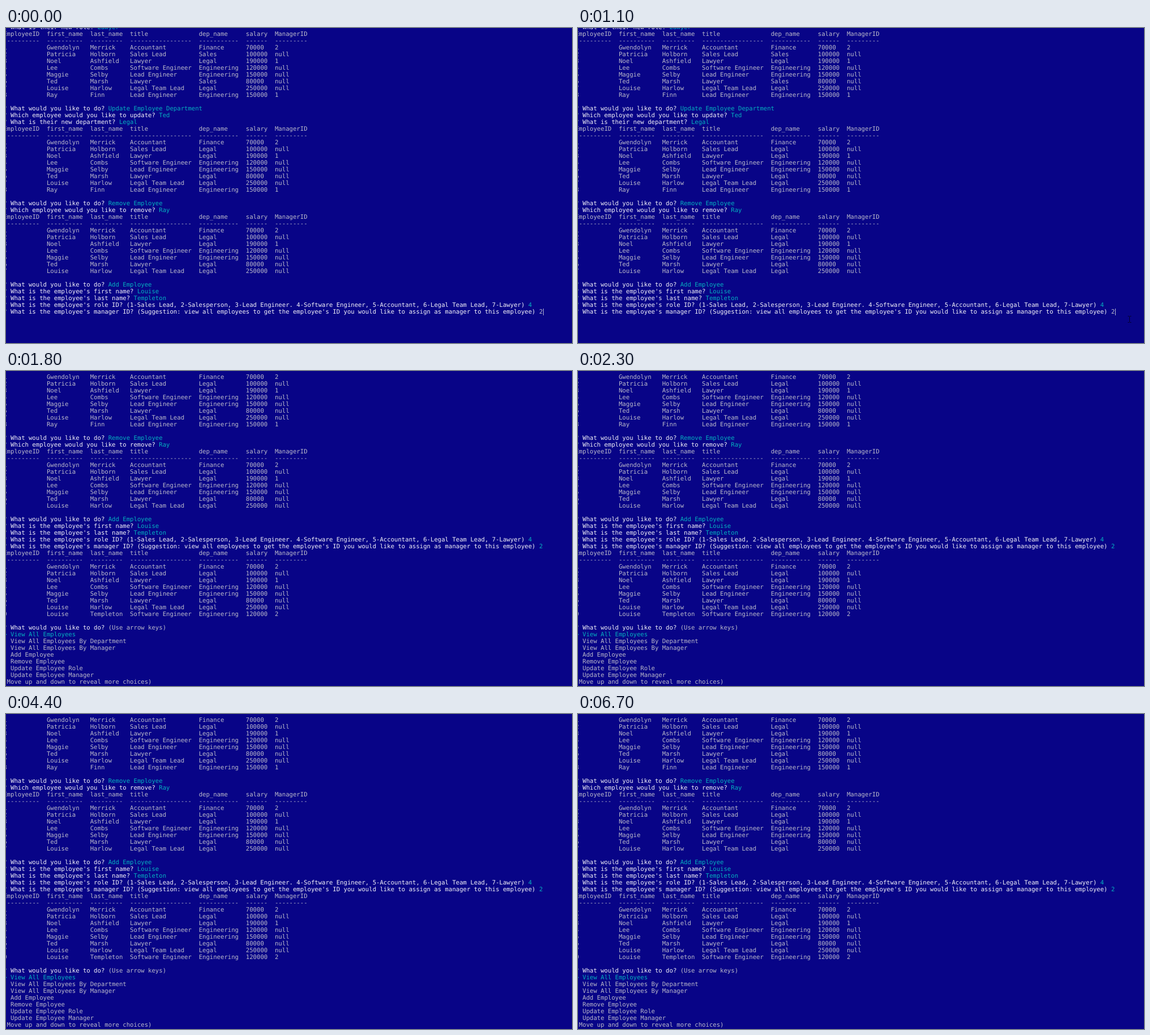
Write an HTML page that moves like this. It is 1000x558 px and loops after 7.2 s.

```html
<!DOCTYPE html>
<html lang="en">
<head>
<meta charset="utf-8">
<title>Employee tracker</title>
<style>
  html, body { margin: 0; width: 100%; height: 100%; overflow: hidden; background: #080487; }
  svg { display: block; width: 1000px; height: 558px; }
  text { font: 10.63px "DejaVu Sans Mono", monospace; white-space: pre; text-rendering: geometricPrecision; fill: #bcbccb; }
  .q { fill: #f4f4fa; }
  .a { fill: #06b2c0; }
  .mark { fill: #8fc4a8; }
</style>
</head>
<body>
<svg viewBox="0 0 1000 558">
  <g id="screen"></g>
  <rect id="caret" x="949" y="497" width="1" height="12" fill="#b4b4d2"/>
  <path id="mouse" d="M-3 -5.5h2.5M.5 -5.5H3M0 -5V5M-3 5.5h2.5M.5 5.5H3" stroke="#02012c" fill="none"/>
</svg>
<script>
const CELL_LEFT = -4.8, TOP = 2, LINE = 12, LOOP = 7200;
const NS = "http://www.w3.org/2000/svg";
const $ = id => document.getElementById(id);
const screen = $("screen");

function make(tag, parent, attrs = {}) {
  const node = parent.appendChild(document.createElementNS(NS, tag));
  for (const key in attrs) node.setAttribute(key, attrs[key]);
  return node;
}

let row = 0;
let block = make("g", screen);

// One terminal line, given as [text, class] runs.
function line(...runs) {
  const text = make("text", block, { x: CELL_LEFT, y: TOP + LINE * row++ });
  for (const [str, cls = ""] of runs)
    make("tspan", text, { class: cls }).textContent = str;
  return text;
}
const ask = (question, answer, cls = "a") =>
  line(["? ", "mark"], [question + " ", "q"], [answer, cls]);

const heads = ["EmployeeID", "first_name", "last_name", "title", "dep_name", "salary", "ManagerID"];
const widths = [10, 10, 9, 17, 11, 6, 9];
const staff = [
  [1, "Gwendolyn", "Merrick", "Accountant", "Finance", 70000, 2],
  [2, "Patricia", "Holborn", "Sales Lead", "Legal", 100000, null],
  [3, "Noel", "Ashfield", "Lawyer", "Legal", 190000, 1],
  [4, "Lee", "Combs", "Software Engineer", "Engineering", 120000, null],
  [5, "Maggie", "Selby", "Lead Engineer", "Engineering", 150000, null],
  [6, "Ted", "Marsh", "Lawyer", "Legal", 80000, null],
  [7, "Louise", "Harlow", "Legal Team Lead", "Legal", 250000, null],
  [8, "Ray", "Finn", "Lead Engineer", "Engineering", 150000, 1],
  [9, "Louise", "Templeton", "Software Engineer", "Engineering", 120000, 2]
];

function table(ids, inSales = []) {
  const put = cells => line([cells.map((c, i) => String(c).padEnd(widths[i])).join("  ")]);
  put(heads);
  put(widths.map(w => "-".repeat(w)));
  for (const person of staff.filter(p => ids.includes(p[0]))) {
    const cells = [...person];
    if (inSales.includes(cells[0])) cells[4] = "Sales";
    put(cells);
  }
  row++;
}

const todo = "What would you like to do?";
const before = [1, 2, 3, 4, 5, 6, 7, 8];

ask("What is their new role?", "Lawyer");
table(before, [2, 6]);
ask(todo, "Update Employee Department");
ask("Which employee would you like to update?", "Ted");
ask("What is their new department?", "Legal");
table(before);
ask(todo, "Remove Employee");
ask("Which employee would you like to remove?", "Ray");
table(before.slice(0, 7));
ask(todo, "Add Employee");
ask("What is the employee's first name?", "Louise");
ask("What is the employee's last name?", "Templeton");
ask("What is the employee's role ID? (1-Sales Lead, 2-Salesperson, 3-Lead Engineer. 4-Software Engineer, 5-Accountant, 6-Legal Team Lead, 7-Lawyer)", "4");
const entry = ask("What is the employee's manager ID? (Suggestion: view all employees to get the employee's ID you would like to assign as manager to this employee)", "2").lastChild;

const result = block = make("g", screen);
table([1, 2, 3, 4, 5, 6, 7, 9]);

const menu = block = make("g", screen);
ask(todo, "(Use arrow keys)", "");
line(["> View All Employees", "a"]);
for (const item of ["View All Employees By Department", "View All Employees By Manager", "Add Employee",
  "Remove Employee", "Update Employee Role", "Update Employee Manager"]) line(["  " + item]);
line(["(Move up and down to reveal more choices)"]);

const show = (node, on) => node.setAttribute("visibility", on ? "visible" : "hidden");

function draw(t) {
  const scroll = t < 1700 ? 0 : t < 1800 ? 8 : 16;
  screen.setAttribute("transform", `translate(0 ${-scroll * LINE})`);
  show(result, t >= 1700);
  show(menu, t >= 1800);
  entry.setAttribute("class", t < 1600 ? "" : "a");
  show($("caret"), t < 300 || (t >= 800 && t < 1300));

  // The pointer drifts in from the lower right and hides on the key press.
  const left = (1 - Math.min(1, Math.max(0, (t - 300) / 700))) ** 2;
  show($("mouse"), t >= 300 && t < 1600);
  $("mouse").setAttribute("transform", `translate(${974.5 + Math.round(14 * left)} ${516 + Math.round(40 * left)})`);
}

function tick() {
  draw(performance.now() % LOOP);
  requestAnimationFrame(tick);
}
tick();
</script>
</body>
</html>
```
